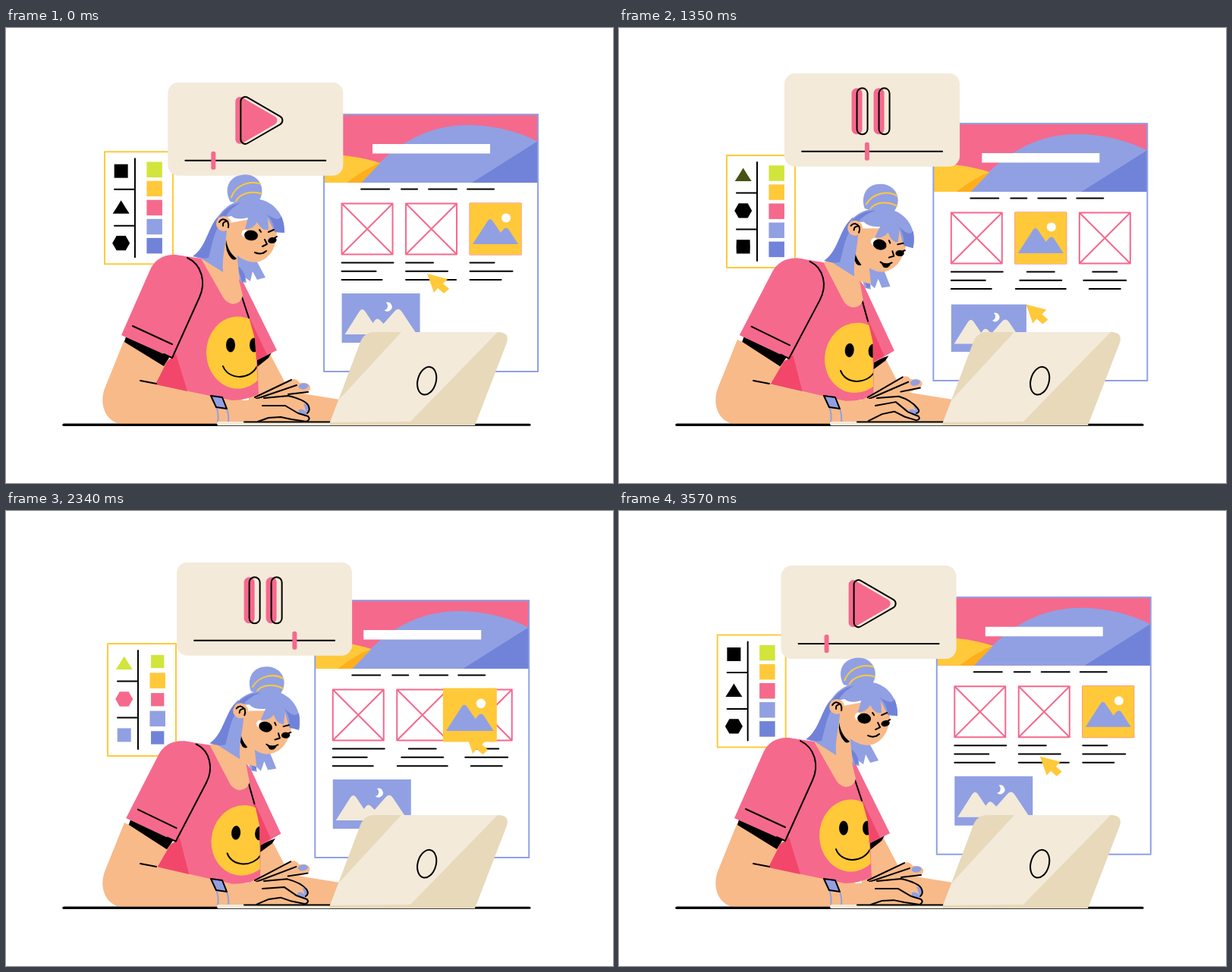
These frames come from a looping animation (800x600 px, 3600 ms). An HTML page with a canvas:

```html
<!DOCTYPE html>
<html lang="en">
<head>
<meta charset="utf-8">
<title>Designer at work</title>
<style>
html, body { margin: 0; width: 100%; height: 100%; overflow: hidden; background: #fff; }
canvas { display: block; width: 800px; height: 600px; }
</style>
</head>
<body>
<canvas id="stage" width="800" height="600"></canvas>
<script>
const ctx = document.getElementById('stage').getContext('2d');
const LOOP = 3600, STEP = 30;
const PINK = '#f5698d', SKIN = '#f8ba89', YELLOW = '#ffc93a', BLUE = '#91a0e3', INDIGO = '#7183d9',
  RED = '#f2476a', CREAM = '#f3eada', TAN = '#e7d9ba', GREEN = '#d1e53c', ORANGE = '#ffae1c', BLACK = '#000';

const mix = (a, b, k) => a + (b - a) * k;
const ease = (t, from, to) => {
  const u = Math.min(1, Math.max(0, (t - from) / (to - from)));
  return u * u * (3 - 2 * u);
};
// Rises during a..b, falls during c..d.
const hold = (t, a, b, c, d) => ease(t, a, b) - ease(t, c, d);

// Smooth periodic curve through [time, value] keys.
function spline(time, keys) {
  const t = (time + LOOP) % LOOP, n = keys.length;
  const key = i => {
    const wrap = Math.floor(i / n), k = keys[i - wrap * n];
    return [k[0] + wrap * LOOP, k[1]];
  };
  const slope = i => (key(i + 1)[1] - key(i - 1)[1]) / (key(i + 1)[0] - key(i - 1)[0]);
  let i = n - 1;
  while (keys[i][0] > t) i--;
  const [t0, v0] = key(i), [t1, v1] = key(i + 1), d = t1 - t0, u = (t - t0) / d;
  const s = u * u * (3 - 2 * u);
  return mix(v0, v1, s) + d * u * (1 - u) * ((1 - u) * slope(i) - u * slope(i + 1));
}

function fill(d, color) {
  ctx.fillStyle = color;
  ctx.fill(new Path2D(d));
}
function line(d, width = 2, color = BLACK) {
  ctx.lineWidth = width;
  ctx.strokeStyle = color;
  ctx.stroke(new Path2D(d));
}
function rect(x, y, w, h, color, r = 0) {
  ctx.fillStyle = color;
  ctx.beginPath();
  ctx.roundRect(x, y, w, h, r);
  ctx.fill();
}
function oval(x, y, rx, ry, color, turn = 0) {
  ctx.fillStyle = color;
  ctx.beginPath();
  ctx.ellipse(x, y, rx, ry, turn, 0, 7);
  ctx.fill();
}
function group(x, y, draw) {
  ctx.save();
  ctx.translate(x, y);
  draw();
  ctx.restore();
}
function clip(d) {
  ctx.clip(new Path2D(d));
}
function turn(x, y, angle) {
  ctx.translate(x, y);
  ctx.rotate(angle);
  ctx.translate(-x, -y);
}

function roundPoly(pts, radius) {
  const n = pts.length, dist = (a, b) => Math.hypot(a[0] - b[0], a[1] - b[1]);
  const path = new Path2D();
  path.moveTo((pts[0][0] + pts[n - 1][0]) / 2, (pts[0][1] + pts[n - 1][1]) / 2);
  pts.forEach((p, i) => {
    const a = pts[(i + n - 1) % n], b = pts[(i + 1) % n];
    const la = dist(a, p), lb = dist(p, b), lc = dist(a, b);
    const cos = (la * la + lb * lb - lc * lc) / (2 * la * lb);
    const tan = Math.sqrt(Math.max(0, (1 - cos) / (1 + cos)));
    path.arcTo(p[0], p[1], b[0], b[1], Math.min(radius, tan * Math.min(la, lb) / 2));
  });
  path.closePath();
  return path;
}

// ---- palette ----
const SQUARE = [[-9, -9], [9, -9], [9, 0], [9, 9], [-9, 9], [-9, 0]];
const TRIANGLE = [[0, -9], [0, -9], [5.5, 0], [11, 8.5], [-11, 8.5], [-5.5, 0]];
const HEXAGON = [[-6, -9.7], [6, -9.7], [11.5, 0], [6, 9.7], [-6, 9.7], [-11.5, 0]];
const blend = (a, b, k) => a.map((p, i) => [mix(p[0], b[i][0], k), mix(p[1], b[i][1], k)]);

function token(y, pts, rgb, k) {
  ctx.fillStyle = `rgb(${rgb.map(c => Math.round(c * k)).join()})`;
  ctx.beginPath();
  pts.forEach(p => ctx.lineTo(21.7 + p[0], y + p[1]));
  ctx.fill();
}

function palette(t) {
  rect(0, 0, 90, 148, '#fff');
  line('M0 0H90V148H0Z', 2, YELLOW);
  line('M40 9V139M13 49.5H40M13 97.5H40');
  token(25.5, blend(SQUARE, TRIANGLE, hold(t, 200, 720, 2480, 2740)), [209, 229, 60], hold(t, 1250, 1500, 2640, 2870));
  token(73, blend(TRIANGLE, HEXAGON, hold(t, 60, 500, 2640, 3100)), [245, 105, 141], hold(t, 1400, 1660, 2760, 3060));
  let third = blend(HEXAGON, SQUARE, ease(t, 400, 1500));
  third = blend(third, TRIANGLE, ease(t, 2560, 2860) * .95);
  third = blend(third, HEXAGON, ease(t, 2860, 3250));
  token(120.5, third, [145, 160, 227], hold(t, 1690, 1980, 2950, 3600));
  const shrink = [hold(t, 1420, 1720, 2600, 2950), 0, hold(t, 1480, 1780, 2780, 3080), 0, hold(t, 1760, 2040, 2860, 3200)];
  [GREEN, YELLOW, PINK, BLUE, INDIGO].forEach((color, i) => {
    const size = 20.5 - 3.2 * shrink[i];
    rect(65.7 - size / 2, 23.6 + i * 25.1 - size / 2, size, size, color);
  });
}

// ---- web page ----
const COLS = [23.5, 108, 192.5];
const TEXT = [[68, 45, 53], [36, 55, 66], [32, 56, 41]];

function photoCard(cx, cy, scale) {
  group(cx, cy, () => {
    ctx.scale(scale, scale);
    rect(-34, -34, 68, 68, YELLOW);
    oval(14, -14.5, 6, 6, '#fff');
    fill('M-30 20L-10 -11Q-7 -15 -4 -11L7 5L11 0Q14 -3 17 0L30 20Z', BLUE);
  });
}

function nightPicture(size) {
  if (size <= 0) return;
  group(23.5, 301, () => {
    ctx.scale(size, size);
    ctx.translate(0, -65);
    rect(0, 0, 103, 65, BLUE);
    fill('M4 54L23 24Q27 18 31 24L41 39L44 35Q47 32 50 35L55 40L70 23Q75 18 79 24L99 54Z', CREAM);
    fill('M58 12A6 6 0 1 1 56 22A5.5 5.5 0 0 0 58 12Z', '#fff');
  });
}

function content(cardX, scale, center, picture) {
  line('M49 98.5H86M102 98.5H123M138 98.5H175M189 98.5H224');
  COLS.forEach((x, i) => {
    line(`M${x} 117.5h67v67h-67ZL${x + 67} 184.5M${x + 67} 117.5L${x} 184.5`, 2, PINK);
    TEXT[i].forEach((w, row) => {
      const shift = i ? center * (67 - w) / 2 : 0;
      line(`M${x + shift} ${195.5 + row * 11.3}h${w}`);
    });
  });
  nightPicture(picture);
  photoCard(cardX, 151, scale);
}

function cursorAt(t, cardX) {
  let x = 136, y = 210;
  const go = (from, to, tx, ty) => {
    const k = ease(t, from, to);
    x = mix(x, tx, k);
    y = mix(y, ty, k);
  };
  go(50, 595, 27, 301);
  go(980, 1400, 126, 236);
  go(1450, 1700, 135, 211);
  go(1800, 2030, 136, 177);
  if (t > 2040) x = cardX - 5;
  go(2510, 2720, 228, 199);
  go(2850, 3480, 136, 210);
  return [x, y];
}

function page(t) {
  rect(0, 0, 282, 339, '#fff');
  ctx.save();
  clip('M0 0H282V339H0Z');
  const scroll = -229 * ease(t, 60, 592);
  const cardX = mix(141.5, 226, ease(t, 2040, 2490));
  if (scroll > -228.9) group(0, scroll, () => content(226, 1, 0, 1));
  group(0, scroll + 229, () => content(cardX, 1 + .045 * hold(t, 2000, 2060, 2480, 2580),
    1 - ease(t, 2850, 3350), ease(t, 970, 1400)));
  rect(0, 0, 282, 90, PINK);
  fill('M49 90C90 40 135 14 190 14C225 14 260 24 282 36V90Z', BLUE);
  fill('M195 90L282 35V90Z', INDIGO);
  fill('M0 53C25 53 50 56 74 64L49 90H0Z', YELLOW);
  fill('M30 90Q55 71 74 64L49 90Z', ORANGE);
  rect(64, 39, 155, 12.5, '#fff');
  ctx.restore();
  line('M0 0H282V339H0Z', 2, BLUE);

  const [x, y] = cursorAt(t, cardX);
  group(x, y, () => fill('M0 0L27 7L21 13L29 20L22 26L14 19L9 25Z', YELLOW));
  const ripple = hold(t, 890, 960, 960, 1050);
  if (ripple > 0) oval(x - 2, y - 2, 4 * ripple, 4 * ripple, PINK);
}

// ---- player ----
function player(t) {
  rect(0, 0, 231, 123, CREAM, 14);
  if (t > 1350 && t < 1950) {
    ctx.save();
    ctx.beginPath();
    ctx.roundRect(0, 0, 231, 123, 14);
    ctx.clip();
    const x = mix(-210, 252, (t - 1350) / 570);
    fill(`M${x} 123l96 -123h110l-96 123Z`, TAN);
    ctx.restore();
  }
  const pause = hold(t, 60, 340, 2600, 2800);
  const left = blend([[96, 14.6], [124, 31], [124, 69], [96, 85.4]], [[95.5, 19.5], [109.5, 19.5], [109.5, 80.5], [95.5, 80.5]], pause);
  const right = blend([[124, 31], [157, 49.5], [157, 50.5], [124, 69]], [[124.5, 19.5], [138.5, 19.5], [138.5, 80.5], [124.5, 80.5]], pause);
  const shapes = pause < .02
    ? [roundPoly([[96, 14.6], [157, 50], [96, 85.4]], 6)]
    : [roundPoly(left, 7), roundPoly(right, 7)];
  // The icon dips in size while it changes.
  const size = 1 - .6 * pause * (1 - pause);
  const icon = dx => {
    ctx.translate(124 + dx, 50);
    ctx.scale(size, size);
    ctx.translate(-124, -50);
  };
  ctx.fillStyle = PINK;
  ctx.lineWidth = 2;
  ctx.strokeStyle = BLACK;
  group(0, 0, () => { icon(-7); shapes.forEach(s => ctx.fill(s)); });
  group(0, 0, () => { icon(0); shapes.forEach(s => ctx.stroke(s)); });

  line('M23 103H208');
  const played = Math.min(113.5, Math.max(0, (t - 305) * .0468)) * (1 - ease(t, 2760, 3360));
  rect(57 + played, 91, 6, 24, PINK, 2.5);
}

// ---- woman ----
function bodyPose(p) {
  ctx.transform(1, .025 * p, -.06 * p, 1 - .028 * p, 31.3 * p, 7.5 * p);
}

function arms() {
  fill('M156 411L131 473C121 497 132 523 158 523H330L300 470L212 435Z', SKIN);
  fill('M320 440L348 430L369 470L378 480L440 490L428 520H320Z', SKIN);
}

function torso(p) {
  ctx.save();
  bodyPose(p);
  fill('M158 407L216 433L208 446L156 414Z', BLACK);
  fill('M328 438L350 428L346 435L331 447Z', BLACK);
  fill(`M300 320L312 334L357 ${425 - 4 * p}L331 438Z`, PINK);
  fill('M222 299L258 304L306 333L320 382L331 438L333 483Q315 491 298 491L197 470L219 434Z', PINK);
  fill(`M319 378L344 ${431 - 3 * p}L329 438Z`, RED);
  fill('M224 430L239 479L197 470L212 440Z', RED);

  ctx.save();
  clip('M250 370H317L328 410L333 485H250Z');
  group(2 * p, 4 * p, () => {
    oval(305.5, 428, 41.5, 47.5, YELLOW);
    oval(296, 418, 6, 9.5, BLACK);
    oval(327, 418, 6, 9.5, BLACK);
    line('M286 446C293 464 321 465 331 446');
  });
  ctx.restore();

  fill('M152 405L189 321C195 306 206 299 222 299Q234 300 240 303C258 312 263 336 255 355L219 435Z', PINK);
  line('M239 303C258 312 264 335 255 355L219 435L208 430M167 393L219 417');
  line('M311 355L320 382');
  fill('M257 304L286 355Q291 363 299 364Q310 363 312 353L306 328L298 298L284 286Z', SKIN);
  ctx.restore();
  line('M177 465L198 469');
}

function eyes(closed) {
  if (closed) {
    line('M310 268Q317 281 334 277M343 277Q350 282 358 277M334 266l2 2M346 267L353 266');
    return;
  }
  oval(315, 271, 4.5, 5, '#fff');
  oval(323, 273.5, 9, 6.8, BLACK, .1);
  oval(351, 280, 5.7, 4, BLACK, -.2);
  line('M347 281L357 275M334 266l2 3M346 269L353 266');
}

function bun(p) {
  ctx.save();
  ctx.translate(25 * p, 7.5 * p);
  turn(287, 258, .19 * p);
  fill('M295 229C286 214 291 194 314 193C333 193 341 211 334 225L322 232Z', BLUE);
  line('M296 223C302 207 320 200 334 205M302 229C307 217 324 214 336 218', 2, YELLOW);
  ctx.restore();
}

function head(t, p) {
  ctx.save();
  ctx.translate(25 * p, 6 * p);
  ctx.save();
  turn(287, 258, .12 * p);
  fill('M297 290L296 308L309 335L317 336L315 329L322 334L325 321L331 332L342 329L328 303Z', BLUE);
  fill('M311 335Q308 320 300 310Q315 318 316 333Z', INDIGO);
  ctx.restore();
  fill('M286 258L302 262L305 305L308 332L286 326L276 300Z', SKIN);

  ctx.save();
  turn(287, 258, .19 * p);
  fill('M290 258L354 246L357 268C356 290 349 302 334 308C318 312 300 300 290 284Z', SKIN);
  fill('M290 279C292 292 297 298 304 304Q301 307 297 304Q288 294 290 279Z', BLACK);
  ctx.restore();

  // Hanging side hair keeps its direction
  fill('M284 244C272 256 268 285 256 303L286 322C284 300 291 283 291 262Z', BLUE);
  fill('M284 244C265 260 266 288 246 301Q258 305 267 303C272 285 274 268 284 256Z', INDIGO);

  turn(287, 258, .19 * p);
  fill('M278 252C286 236 303 225 327 225C350 226 368 244 367 270L354 269Q348 257 345 250L346 266Q337 268 331 256Q325 266 315 265L319 250Q304 254 297 248Z', BLUE);
  fill('M337 241Q353 251 354 269L367 270Q367 258 363 248Q359 258 337 241Z', INDIGO);
  fill('M281 249Q291 234 310 230Q294 238 288 252Z', INDIGO);
  oval(287, 258, 10, 10, SKIN);
  line('M281 256Q285 249 292 255Q294 259 293 263M286 261Q285 256 290 255');
  eyes(t > 2640 && t < 2820);
  line('M341 279L344 285L338 288');
  fill(`M328 296Q335 ${299 - p} 342 295Q340 ${299 + 5 * p} 333 ${298 + 4 * p}Z`, BLACK);
  line('M328 296Q336 300 343 294');
  ctx.restore();
}

function hands(q) {
  // Far fingers
  ctx.save();
  turn(330, 490, -.1 * q);
  fill('M320 490L372 465Q382 460 387 468Q399 467 401 473Q402 479 394 481L370 490L340 502Z', SKIN);
  oval(392, 472.5, 6.5, 4, BLUE, -.1);
  line('M328 487L376 464M330 489L383 471M372 483L398 480');
  ctx.restore();

  // Near hand: the knuckles rise as the fingertips press down
  const at = (x0, y0, x1, y1) => `${mix(x0, x1, q)} ${mix(y0, y1, q)}`;
  const knuckle = at(372, 485, 368, 486), tip = at(398, 497, 393, 503), end = at(396, 519, 391, 517);
  fill(`M286 492Q318 492 330 489L${knuckle}Q${at(393, 490, 383, 491)} ${tip}Q${at(403, 504, 396, 508)} ${at(398, 511, 394, 511)}Q${at(402, 516, 397, 516)} ${end}L${at(362, 513, 363, 504)}L330 522H280Z`, SKIN);
  fill(`M${at(392, 495, 387, 497)}L${tip}Q${at(402, 504, 395, 507)} ${at(396, 507, 391, 508)}Z`, BLUE);
  group(-4 * q, 0, () => oval(391, 507, 6, 3.5, BLUE, .5));
  line(`M340 488L${knuckle}Q${at(393, 490, 383, 491)} ${tip}Q${at(402, 504, 396, 507)} ${at(397, 508, 391, 508)}`);
  line(`M338 498L${at(368, 498, 364, 492)}L${at(385, 508, 380, 506)}L${at(398, 512, 394, 512)}Q${at(402, 516, 397, 516)} ${end}L${at(376, 516, 377, 512)}L${at(362, 513, 363, 504)}L${at(346, 514, 347, 508)}L${at(332, 519, 328, 518)}`);

  // Watch
  line('M277 499Q281 510 279 520M291 502Q294 510 293 521', 2, BLUE);
  fill('M270 485L285 487L291 502L277 500Z', BLUE);
  line('M270 485L285 487L291 502L277 500Z');
}

function laptop() {
  rect(278, 519, 152, 5, CREAM, 2);
  line('M314 519.5H428');
  fill('M427 520L467 414Q472 401 486 401H650Q664 402 660 415L618 524H427Z', TAN);
  fill('M427 520L438 491L521 401H648L533 519Z', CREAM);
  ctx.lineWidth = 2;
  ctx.strokeStyle = BLACK;
  ctx.beginPath();
  ctx.ellipse(554.7, 465.2, 12, 18.7, .27, 0, 7);
  ctx.stroke();
}

const LEAN = [[0, 0], [450, .46], [930, .85], [1740, 1], [2340, .89], [2730, .67]];
const REACH = [[0, 0], [450, 1], [930, .95], [1740, .65], [2340, .35], [2730, .25]];

function draw(t) {
  ctx.clearRect(0, 0, 800, 600);
  ctx.lineCap = ctx.lineJoin = 'round';
  const angle = (t - 1360) / LOOP * 2 * Math.PI;
  const c = 7 * Math.cos(angle), s = 7 * Math.sin(angle);
  group(135 + c, 168 + s, () => palette(t));
  group(414.2 - s, 119 + c, () => page(t));
  group(218.2 + s, 66.8 - c, () => player(t));

  line('M76 523.3H690', 3);
  const lean = spline(t, LEAN);
  arms();
  torso(lean);
  bun(spline(t - 90, LEAN));
  head(t, lean);
  hands(spline(t, REACH));
  line('M76 523.3H278', 3);
  laptop();
}

function tick() {
  draw(Math.floor(performance.now() % LOOP / STEP) * STEP);
  requestAnimationFrame(tick);
}
tick();
</script>
</body>
</html>
```
